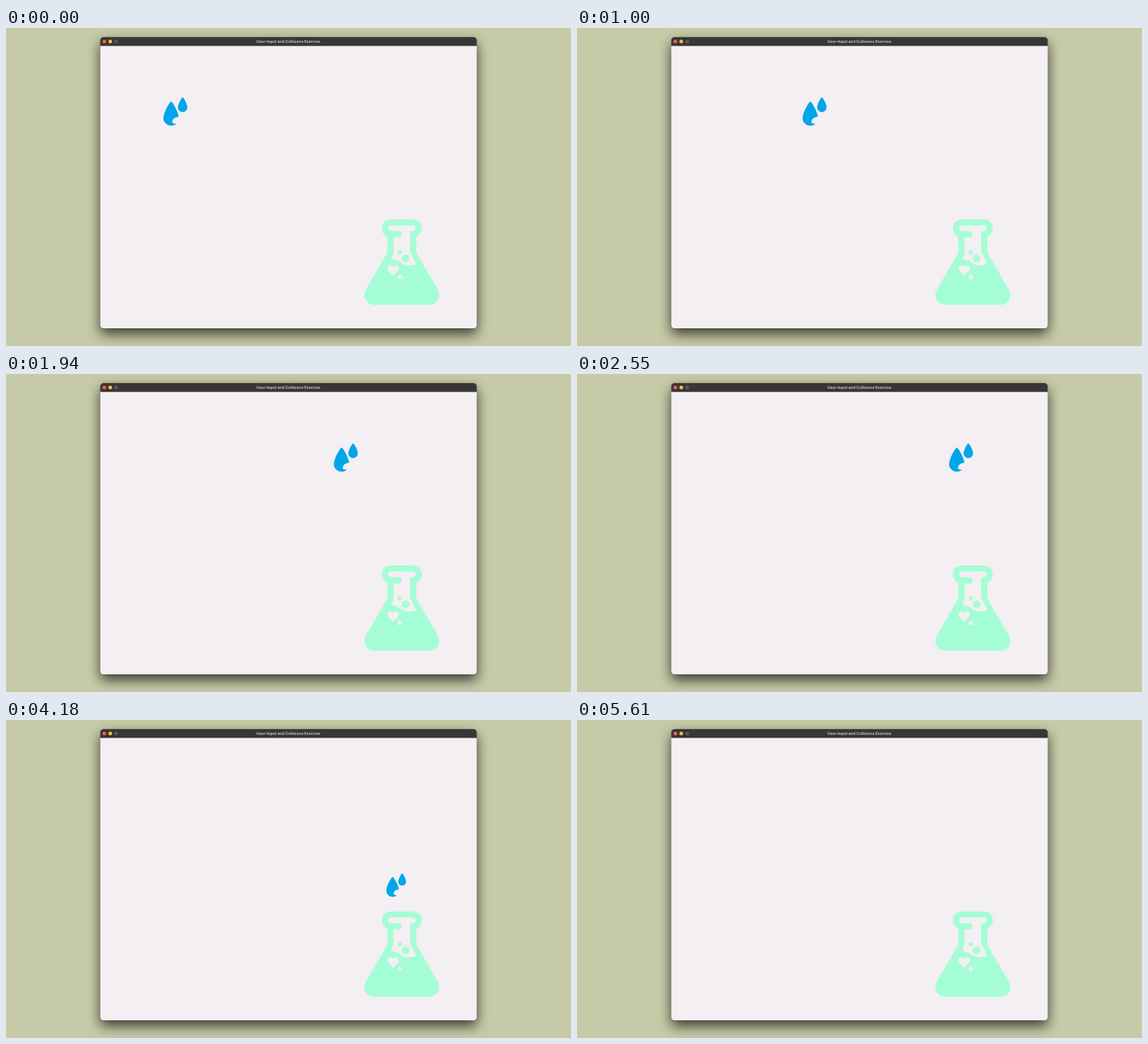
Animation of 800x450 px, one loop 5.7 s. Source, as an HTML page:

```html
<!DOCTYPE html>
<html lang="en">
<head>
<meta charset="utf-8">
<title>User-Input and Collisions Exercise</title>
<style>
  html, body { margin: 0; width: 100%; height: 100%; overflow: hidden; background: #c6caa7; }
  svg { display: block; }
  .title { font: 700 5.4px Inter, "Liberation Sans", sans-serif; fill: #c3c0c1; text-anchor: middle; }
  .flask { fill: #a5fdd5; }
  .body { stroke: #a5fdd5; stroke-width: 28; stroke-linejoin: round; }
  .gap { fill: #f3eff3; }
  .heart { fill: none; stroke: #f3eff3; stroke-width: 8.4; stroke-linecap: round; }
  .drops { fill: #00a6e8; }
</style>
</head>
<body>
<svg width="800" height="450" viewBox="0 0 800 450">
  <defs>
    <filter id="blur" x="-10%" y="-10%" width="120%" height="125%"><feGaussianBlur stdDeviation="9"/></filter>
    <rect id="pane" x="133.4" y="13.1" width="533.2" height="411.900" rx="4.5"/>
    <clipPath id="frame"><use href="#pane"/></clipPath>
  </defs>

  <use href="#pane" y="8" opacity=".7" filter="url(#blur)"/>
  <use href="#pane" fill="none" stroke="#000" stroke-opacity=".5" stroke-width=".6"/>
  <use href="#pane" class="gap"/>
  <rect x="133" y="13" width="534" height="12.4" fill="#383637" clip-path="url(#frame)"/>
  <circle cx="139.2" cy="19" r="2.6" fill="#fc5b53"/>
  <circle cx="147.6" cy="19" r="2.6" fill="#fdbc3a"/>
  <circle cx="156" cy="19" r="2.6" fill="#585a53"/>
  <text class="title" x="399.8" y="20.9">User-Input and Collisions Exercise</text>

  <g class="flask">
    <rect x="532.2" y="271" width="56.6" height="25" rx="12.3"/>
    <rect x="540" y="285" width="41" height="36"/>
    <path class="body" d="M552 325H569L599.6 377.700H521.4Z"/>
    <rect class="gap" x="541" y="279.500" width="39" height="8" rx="4"/>
    <path class="gap" d="M548.700 284H572.300V317L580 331.500Q581 335 577 335.300
      Q566 337 560.500 333T548 327.200Q545 327 546.500 324.200L548.700 318Z"/>
    <rect x="541" y="287.400" width="19.300" height="9.200" rx="4.600"/>
    <circle cx="557.600" cy="317.500" r="3"/>
    <circle cx="565.800" cy="325.800" r="5.400"/>
    <path class="heart" d="M544.300 340.200L548.300 344.500L552.300 340.200"/>
    <circle class="gap" cx="557.700" cy="352.300" r="3.100"/>
  </g>

  <g id="drops" class="drops">
    <path id="big"/>
    <path class="gap" d="M8.800 3.500C10.500 9 9.500 13.500 5.500 16.200Q1 19 -4.400 15.900
      Q-4.300 9.300 1.500 8.200Q7.500 7.300 8.800 3.500Z"/>
    <path id="small"/>
  </g>
</svg>
<script>
  const loop = 5700;
  const home = { x: 239.8, y: 118 };
  const speed = { right: 0.154, down: 0.1637 };  // px per ms
  const drops = document.getElementById("drops");

  const clamp = (v, lo, hi) => Math.min(hi, Math.max(lo, v));

  // How long a key pressed from start to end has been down at time t
  const held = (t, start, end) => clamp(t, start, end) - start;

  // A pointed top that widens into a half circle of radius r
  function tear(id, cx, top, bottom, r) {
    const cy = bottom - r, h = cy - top;
    const near = 0.15 * r, shoulder = top + 0.66 * h;
    document.getElementById(id).setAttribute("d",
      `M${cx} ${top}C${cx + near} ${top} ${cx + r} ${shoulder} ${cx + r} ${cy}` +
      `A${r} ${r} 0 0 1 ${cx - r} ${cy}` +
      `C${cx - r} ${shoulder} ${cx - near} ${top} ${cx} ${top}Z`);
  }

  function draw(now) {
    const t = now % loop;
    const x = home.x + speed.right * (held(t, 374, 2317) + held(t, 2520, 2607));
    const y = home.y + speed.down * held(t, 3475, 4470);
    const scale = 1 - held(t, 4120, 4470) / 350;
    drops.setAttribute("transform", `translate(${x} ${y}) scale(${scale})`);
    requestAnimationFrame(draw);
  }

  tear("big", -6, -14, 20.3, 10.9);
  tear("small", 10.3, -20, 0.9, 6.7);
  draw(performance.now());
</script>
</body>
</html>
```
